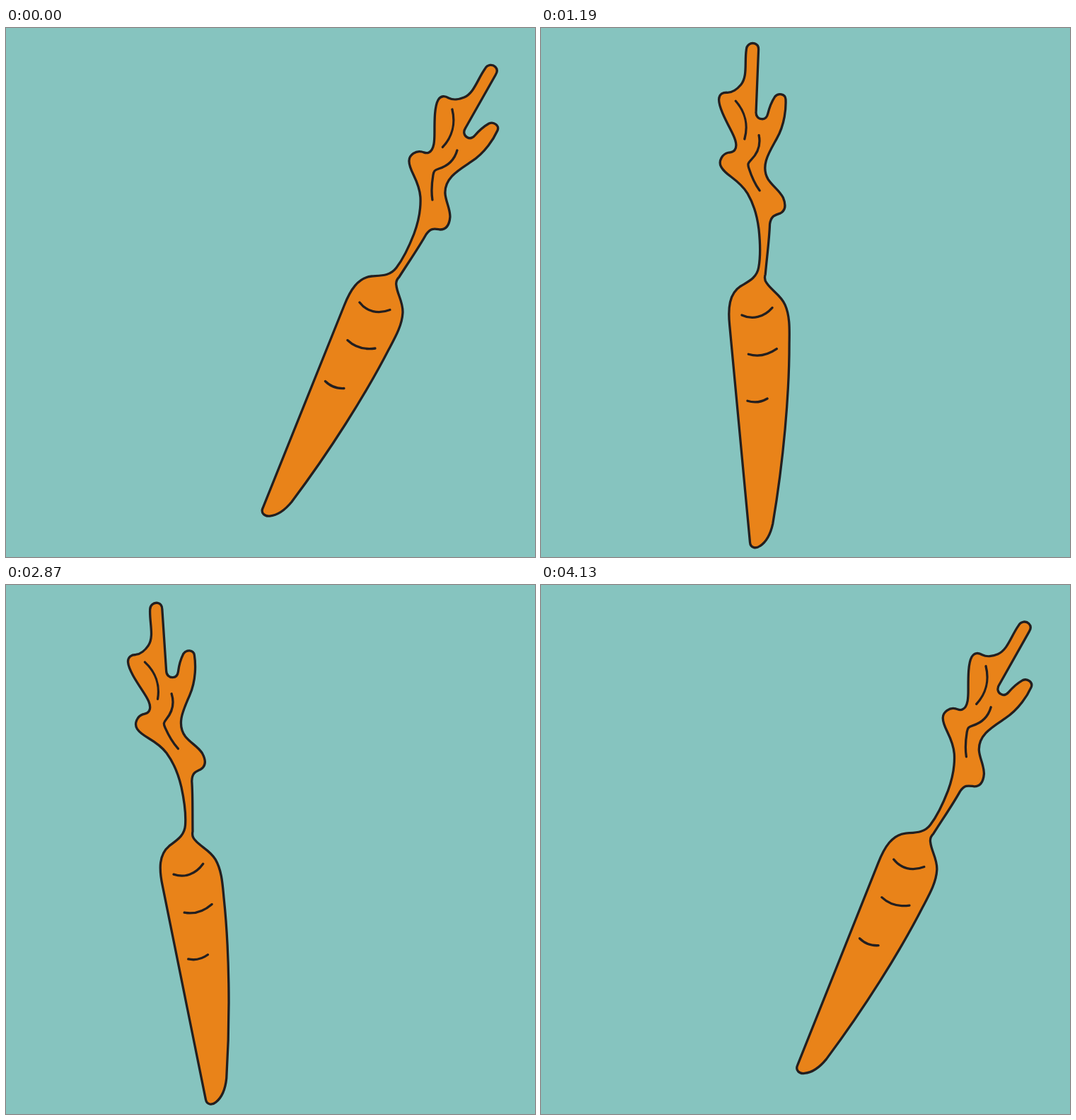
Recreate the animation shown at these times as an HTML page. Size 748 by 748 pixels, loop 4.2 s.

```html
<!DOCTYPE html>
<html lang="en">
<head>
<meta charset="utf-8">
<title>Swinging carrot</title>
<style>
  html, body { margin: 0; height: 100%; overflow: hidden; background: #86c4bf; }
  svg { display: block; width: 100vw; height: 100vh; }
  path { fill: none; stroke: #231f20; stroke-width: 3.3; stroke-linecap: round; stroke-linejoin: round; }
  .body { fill: #e98319; }
</style>
</head>
<body>
<svg viewBox="0 0 748 748">
  <g id="carrot">
    <path class="body" d="M677.5 57.5
      C681 51.5 688 51 692 55 C695 58 695 62 692.5 66
      L650 141
      C646 147 648 152 652 154.5 C656 157 660 155.5 663 152
      C669 145 676 139 683 135 C690 132 698 138 695 145
      C690 156 678 176 658 189 C640 201 620 212 621 234
      C622 246 628 255 628 267 C627 279 622 285 614 285
      C606 284 601 282 594 292 C584 310 570 330 556 352
      C553 355 551 359 552 364 C553 376 562 388 561 403
      C560 421 550 438 541 455 C508 519 458 598 404 670
      C395 681 384 689 373 690 C366 691 360 686 363 679
      L478 393
      C487 370 498 353 517 351 C530 350 543 351 552 339
      C562 326 570 309 577 291 C584 272 587 257 586 239
      C584 214 570 203 570 188 C570 179 580 173 588 175
      C592 176 594 178 598 176 C606 172 606 158 606 147
      C606 130 606 111 611 102 C615 95 621 96 626 99
      C632 102 641 101 648 98 C662 92 667 72 677.5 57.5Z"/>
    <path d="M631 115C636 135 631 154 617.5 168.5
      M638 173C634 187 625 195 612 199C606 201 605 202 604 208C602 220 601 230 603 243
      M500 388C510 401 526 405 543 398.5
      M483 441.5C493 451 507 455 522 453
      M451.5 499.5C459 507 468 510 478 509.5"/>
  </g>
</svg>
<script>
const carrot = document.getElementById('carrot');
const SWING = 2100, STEP = 70, LAG = 18;

// Ease-in-out: cubic Bezier (.42, 0, .58, 1), solved for x by bisection
function ease(x) {
  let lo = 0, hi = 1, s = 0.5;
  for (let i = 0; i < 30; i++) {
    s = (lo + hi) / 2;
    const at = 1.26 * (1 - s) ** 2 * s + 1.74 * (1 - s) * s * s + s ** 3;
    if (at < x) lo = s; else hi = s;
  }
  return s * s * (3 - 2 * s);
}

function draw(now) {
  const time = Math.floor(now / STEP + 0.1) * STEP - LAG;
  const phase = Math.abs(time) / SWING % 2;
  const p = ease(phase < 1 ? phase : 2 - phase);
  carrot.setAttribute('transform',
    `translate(${-375.5 * p} 0) rotate(${-45.5 * p} 541.4 378.4)`);
  requestAnimationFrame(draw);
}
draw(0);
</script>
</body>
</html>
```
